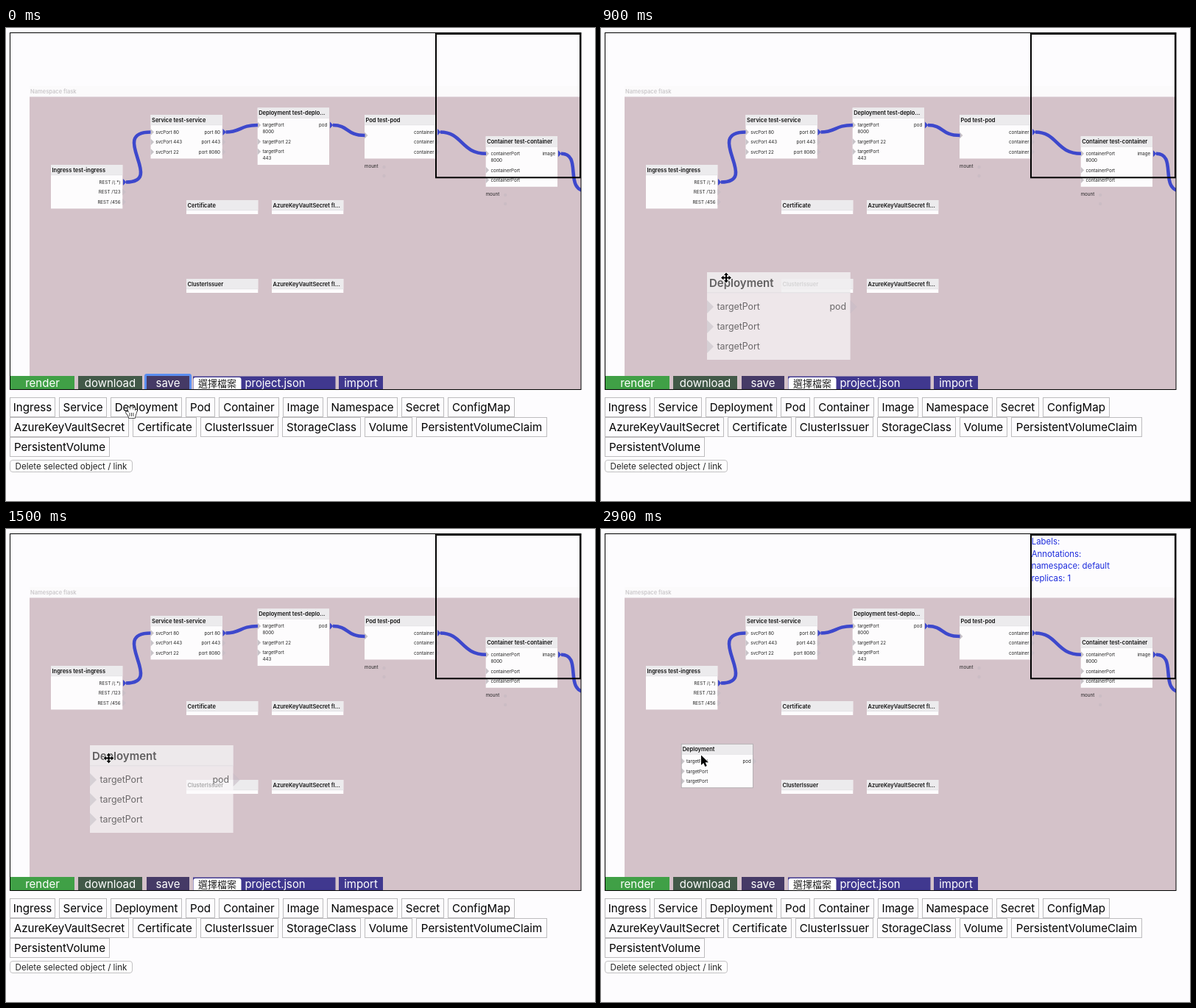
These frames come from a looping animation (800x643 px, 3 s). An HTML page with a canvas:

```html
<!DOCTYPE html>
<html lang="en">
<head>
<meta charset="utf-8">
<title>Graph editor</title>
<style>
html, body { margin: 0; width: 100%; height: 100%; overflow: hidden; background: #fdfcfe; }
canvas { display: block; }
</style>
</head>
<body>
<canvas id="stage" width="800" height="643"></canvas>
<script>
const ctx = document.getElementById('stage').getContext('2d', { alpha: false });
const SANS = 'Inter, "Noto Sans CJK TC", "Noto Sans CJK", sans-serif';
const PAPER = '#fdfcfe', BLUE = '#3d48cc', PORT = '#c8c3c8';

function rect(x, y, w, h, color) {
  ctx.fillStyle = color;
  ctx.fillRect(x, y, w, h);
}

function text(str, x, y, size, color = '#000', align = 'left', weight = 400) {
  ctx.font = `${weight} ${size}px ${SANS}`;
  ctx.textAlign = align;
  ctx.fillStyle = color;
  ctx.fillText(str, x, y);
}

function outline(x, y, w, h, color, width = 1) {
  ctx.strokeStyle = color;
  ctx.lineWidth = width;
  ctx.strokeRect(x, y, w, h);
}

function rounded(x, y, w, h, r, fill, stroke) {
  ctx.beginPath();
  ctx.roundRect(x, y, w, h, r);
  ctx.fillStyle = fill;
  ctx.fill();
  if (stroke) {
    ctx.strokeStyle = stroke;
    ctx.lineWidth = 1;
    ctx.stroke();
  }
}

function port(x, y, color = PORT) {
  ctx.fillStyle = color;
  ctx.beginPath();
  ctx.moveTo(x, y - 4.5);
  ctx.lineTo(x + 4.5, y);
  ctx.lineTo(x, y + 4.5);
  ctx.fill();
}

// Inputs may carry a second line after "|".
function node(x, y, title, inputs = [], outputs = [], border) {
  const w = 97.3;
  const extra = inputs.filter(s => s.includes('|')).length;
  const h = 19 + 13.5 * Math.max(inputs.length, outputs.length) + 9 * extra;
  rect(x, y, w, h, '#fdfcfd');
  rect(x, y, w, 14, '#ecebed');
  rect(x, y + 13.6, w, 0.6, '#dddbde');
  text(title, x + 1.5, y + 9.8, 7.5, '#111', 'left', 600);
  outputs.forEach((label, i) => {
    const row = y + 23.5 + 13.5 * i;
    port(x + w, row, '#c9bec6');
    text(label, x + w - 2.8, row + 2.2, 6.2, '#222', 'right');
  });
  let row = y + 23.5;
  for (const input of inputs) {
    const [label, value] = input.split('|');
    port(x, row);
    text(label, x + 6.7, row + 2.2, 6.2, '#222');
    if (value) text(value, x + 6.7, row + 11.2, 6.2, '#222');
    row += value ? 22.5 : 13.5;
  }
  if (border) outline(x, y, w, h, border, 0.8);
}

function link(x1, y1, x2, y2, bend) {
  ctx.strokeStyle = BLUE;
  ctx.lineWidth = 4.6;
  ctx.beginPath();
  ctx.moveTo(x1 + 4, y1);
  ctx.bezierCurveTo(x1 + bend, y1, x2 - bend, y2, x2, y2);
  ctx.stroke();
  port(x1, y1, BLUE);
}

function mount(x, y) {
  text('mount', x, y + 2, 6.2, '#222');
  for (const dy of [1, 13]) {
    ctx.fillStyle = '#cbbcc4';
    ctx.beginPath();
    ctx.arc(x + 26.5, y + dy, 2.2, 0, 7);
    ctx.fill();
  }
}

function graph(dropped) {
  ctx.save();
  ctx.beginPath();
  ctx.rect(5, 6, 776, 485);
  ctx.clip();
  rect(32, 79, 749, 14, '#fbfafb');
  rect(32, 93.5, 749, 398, '#d4c2c9');
  text('Namespace flask', 33, 89, 7.5, '#cbc8cb', 'left', 600);
  node(61, 186, 'Ingress test-ingress', [], ['REST /(.*)', 'REST /123', 'REST /456']);
  node(196.5, 118, 'Service test-service', ['svcPort 80', 'svcPort 443', 'svcPort 22'],
    ['port 80', 'port 443', 'port 8080']);
  node(341.7, 108.5, 'Deployment test-deplo...', ['targetPort|8000', 'targetPort 22', 'targetPort|443'], ['pod']);
  node(487, 118, 'Pod test-pod', [], ['container', 'container', 'container']);
  port(487, 146);
  mount(487, 188);
  node(651.7, 147.3, 'Container test-container', ['containerPort|8000', 'containerPort', 'containerPort'], ['image']);
  mount(651.7, 226);
  node(245, 234, 'Certificate');
  node(361, 234, 'AzureKeyVaultSecret fl...');
  node(245, 341, 'ClusterIssuer');
  node(361, 341, 'AzureKeyVaultSecret fl...');
  if (dropped) node(109.2, 292.3, 'Deployment', Array(3).fill('targetPort'), ['pod'], '#aaa5a9');
  link(159, 209.5, 196.5, 141.5, 58);
  link(294.5, 141.5, 342, 132, 25);
  link(440, 132, 487.5, 146, 26);
  link(586, 141.5, 652, 170.8, 34);
  link(750, 170.8, 790, 222, 34);
  ctx.restore();
}

function toolbar(focused) {
  ctx.save();
  ctx.beginPath();
  ctx.rect(5, 6, 776, 485);
  ctx.clip();
  const buttons = [
    ['render', 6, 87, '#40a046'], ['download', 98, 87, '#425948'],
    ['save', 191, 58, '#453a66'], ['import', 452, 60, '#40388f'],
  ];
  if (focused) rounded(188, 470, 64, 30, 3, '#5b8df0');
  for (const [label, x, w, color] of buttons) {
    rect(x, 473, w, 18, color);
    text(label, x + w / 2, 488, 15, '#fff', 'center');
  }
  rect(254, 473.5, 193.5, 18, '#40388f');
  rounded(254.5, 475, 65, 20, 3, '#fff');
  text('選擇檔案', 287, 488, 13, '#222', 'center');
  text('project.json', 324.5, 488, 14.8, '#fff');
  ctx.restore();
}

const palette = [
  [['Ingress', 5, 67], ['Service', 72, 137], ['Deployment', 142, 239], ['Pod', 244, 284],
   ['Container', 289, 371], ['Image', 376, 431], ['Namespace', 436, 532], ['Secret', 537, 595],
   ['ConfigMap', 600, 691]],
  [['AzureKeyVaultSecret', 5, 167], ['Certificate', 172, 259], ['ClusterIssuer', 264, 370],
   ['StorageClass', 375, 482], ['Volume', 487, 552], ['PersistentVolumeClaim', 557, 735]],
  [['PersistentVolume', 5, 141]],
];

function menu() {
  palette.forEach((row, i) => {
    const y = 502.5 + 27 * i;
    for (const [label, left, right] of row) {
      outline(left + 0.5, y, right - left - 1, 26, '#bdbcbe');
      text(label, (left + right) / 2, y + 18.8, 15.1, '#000', 'center');
    }
  });
  rounded(5.5, 587.5, 166, 16, 3.5, '#fefefe', '#c2c1c3');
  text('Delete selected object / link', 88.5, 599.5, 11.6, '#222', 'center');
}

function inspector(selected) {
  outline(584, 8, 196, 195.3, '#000', 2);
  if (!selected) return;
  ['Labels:', 'Annotations:', 'namespace: default', 'replicas: 1'].forEach((line, i) =>
    text(line, 584.7, 21.2 + 16.5 * i, 11.4, '#1c2bdc'));
}

function cursor(x, y, path, fill, stroke, width) {
  const shape = new Path2D(path);
  ctx.save();
  ctx.translate(x, y);
  ctx.lineJoin = 'round';
  ctx.lineWidth = width;
  ctx.strokeStyle = stroke;
  ctx.fillStyle = fill;
  ctx.stroke(shape);
  ctx.fill(shape);
  ctx.restore();
}

const HAND = 'M-3 9L-4 6L-7 2Q-7-1-4 1L-3 2L-5-4Q-4-7-2-5L-1-1L-1-6Q1-8 2-6L2-1L3-5Q5-6 5-4L5 0L6-2Q8-3 8-1L6 5L5 9Z';
const MOVE = 'M0-7L3-3.5H1V-1H3.5V-3L7 0L3.5 3V1H1V3.5H3L0 7L-3 3.5H-1V1H-3.5V3L-7 0L-3.5-3V-1H-1V-3.5H-3Z';
const ARROW = 'M0 0V13.5L3.2 10.6L5.4 15.6L7.8 14.6L5.6 9.8H10Z';

// time, ghost x, ghost y, pointer x, pointer y
const drag = [
  [300, 145, 411, 174, 418], [600, 145, 389, 175, 394], [900, 144, 332, 170, 339.5],
  [1100, 132.5, 308.5, 160, 328], [1500, 114, 294, 139.5, 311.5], [1700, 109, 292, 136, 309],
];

function dragAt(t) {
  const i = drag.findIndex(key => key[0] > t);
  const a = drag[i - 1], b = drag[i];
  const k = (t - a[0]) / (b[0] - a[0]);
  return a.map((v, j) => v + (b[j] - v) * k);
}

function ghost(x, y) {
  ctx.save();
  ctx.globalAlpha = 0.64;
  ctx.translate(x, y);
  ctx.scale(2, 2);
  node(0, 0, 'Deployment', Array(3).fill('targetPort'), ['pod']);
  ctx.restore();
}

function draw(t) {
  const dropped = t >= 1700;
  rect(0, 0, 800, 643, PAPER);
  graph(dropped);
  toolbar(t < 100);
  inspector(dropped);
  outline(5.5, 6.5, 775.5, 485, '#000');
  menu();
  if (t < 300) {
    cursor(170, 521, HAND, '#fff', '#222', 1.6);
    ctx.fillStyle = '#333';
    for (const dx of [-2, 0.5, 3]) ctx.fillRect(169.5 + dx, 523, 0.9, 5);
  } else if (!dropped) {
    const [, gx, gy, px, py] = dragAt(t);
    ghost(gx, gy);
    cursor(px, py, MOVE, '#000', '#fff', 1.6);
  } else {
    cursor(136, 307.5, ARROW, '#000', '#fff', 1.8);
  }
}

function tick(now) {
  draw(Math.floor(now % 3000 / 100) * 100);
  requestAnimationFrame(tick);
}
requestAnimationFrame(tick);
</script>
</body>
</html>
```
